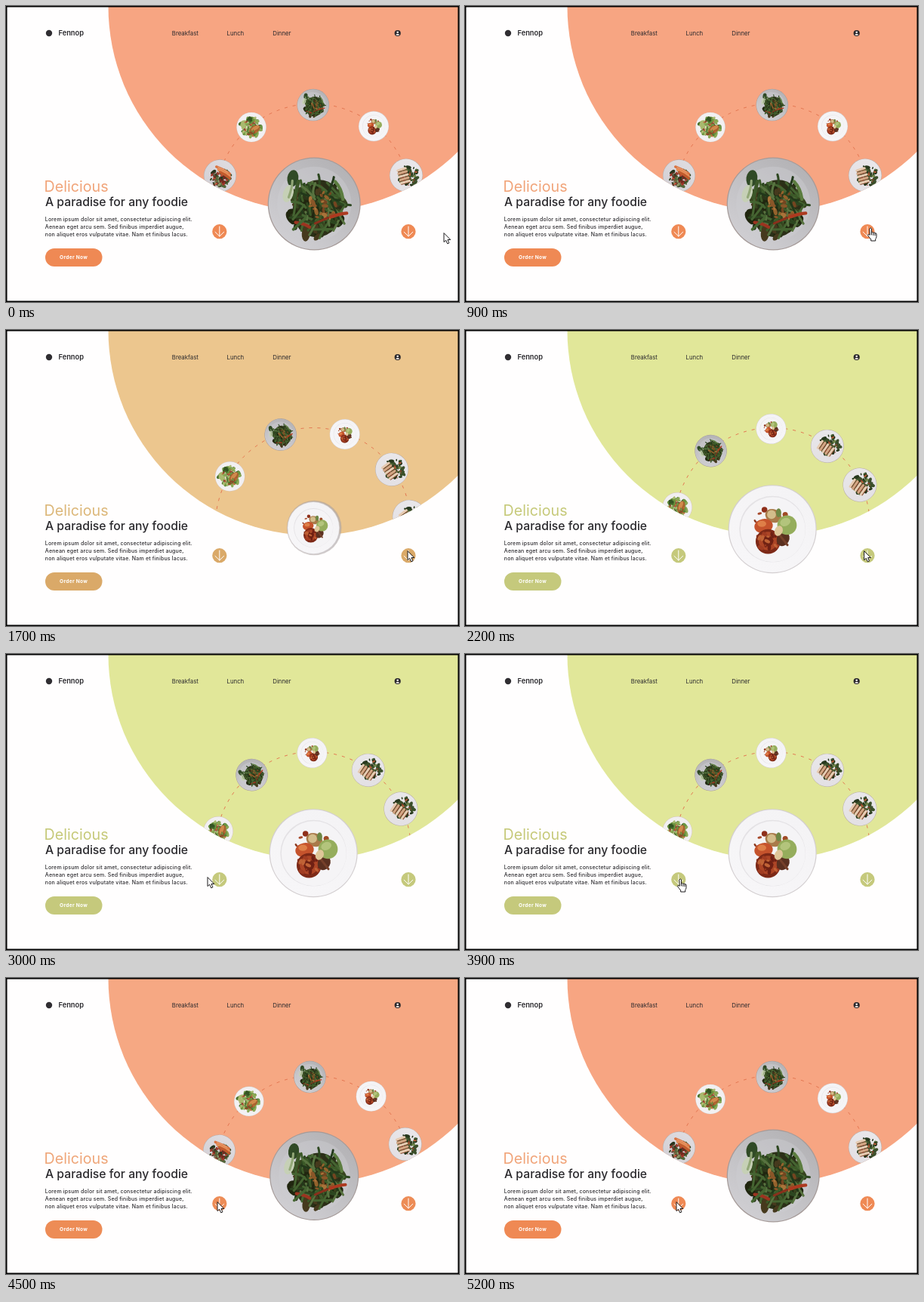
An HTML page with a canvas for the animation above (5.3 s loop, 600 by 392 pixels).

```html
<!DOCTYPE html>
<html lang="en">
<head>
<meta charset="utf-8">
<title>Food landing page</title>
<style>
  html, body { margin: 0; width: 600px; height: 392px; overflow: hidden; background: #fff; }
  canvas, svg { position: absolute; left: 0; top: 0; width: 600px; height: 392px; }
  text { font-family: Inter, "Open Sans", sans-serif; fill: #2a292d; }
  .brand { font-size: 9.3px; font-weight: 600; }
  .nav { font-size: 7.8px; }
  .title { font-size: 19.7px; }
  .lead { font-size: 15.75px; font-weight: 500; }
  .copy { font-size: 7px; font-weight: 500; letter-spacing: .18px; }
  .order { font-size: 6.6px; font-weight: 700; letter-spacing: .3px; fill: #fff; }
</style>
</head>
<body>
<canvas id="stage"></canvas>
<svg viewBox="0 0 600 392">
  <text class="brand" x="69.5" y="39.3">Fennop</text>
  <text class="nav" x="219.8" y="39.4">Breakfast</text>
  <text class="nav" x="292.5" y="39.4">Lunch</text>
  <text class="nav" x="353.3" y="39.4">Dinner</text>
  <text class="title" id="title" x="50.5" y="245.5">Delicious</text>
  <text class="lead" x="52" y="265">A paradise for any foodie</text>
  <text class="copy" x="51.8" y="285.4">Lorem ipsum dolor sit amet, consectetur adipiscing elit.</text>
  <text class="copy" x="51.8" y="295.2">Aenean eget arcu sem. Sed finibus imperdiet augue,</text>
  <text class="copy" x="51.8" y="305">non aliquet eros vulputate vitae. Nam et finibus lacus.</text>
  <text class="order" x="71" y="335.4">Order Now</text>
</svg>
<script>
const canvas = document.getElementById('stage');
const title = document.getElementById('title');
const ctx = canvas.getContext('2d');
const LOOP = 5300, STEP = 100, TAU = Math.PI * 2, RAD = Math.PI / 180;
const dpr = window.devicePixelRatio || 1;
canvas.width = 600 * dpr;
canvas.height = 392 * dpr;

const ORANGE = { back: [247, 165, 130], tint: [239, 137, 84], title: [241, 164, 121] };
const GREEN = { back: [225, 231, 153], tint: [197, 201, 124], title: [198, 201, 121] };

const lerp = (a, b, p) => a + (b - a) * p;
const ease = (t, from, to) => {
  const p = Math.min(1, Math.max(0, (t - from) / (to - from)));
  return p * p * (3 - 2 * p);
};
const mix = (key, p) =>
  `rgb(${ORANGE[key].map((v, i) => Math.round(lerp(v, GREEN[key][i], p)))})`;

function seeded(seed) {
  return () => {
    seed = (seed * 16807) % 2147483647;
    return seed / 2147483647;
  };
}

function disc(x, y, r, color) {
  ctx.fillStyle = color;
  ctx.beginPath();
  ctx.arc(x, y, r, 0, TAU);
  ctx.fill();
}

function blob(x, y, rx, ry, turn, color) {
  ctx.fillStyle = color;
  ctx.beginPath();
  ctx.ellipse(x, y, rx, ry, turn, 0, TAU);
  ctx.fill();
}

function strip(x1, y1, x2, y2, width, color, bend = 0) {
  ctx.strokeStyle = color;
  ctx.lineWidth = width;
  ctx.lineCap = 'round';
  ctx.beginPath();
  ctx.moveTo(x1, y1);
  ctx.quadraticCurveTo((x1 + x2) / 2 + bend, (y1 + y2) / 2 - bend, x2, y2);
  ctx.stroke();
}

// Scatter small leaves inside an ellipse around (x, y).
function scatter(seed, count, x, y, w, h, size, colors) {
  const rnd = seeded(seed * 7919);
  for (let i = 0; i < count; i++) {
    const a = rnd() * TAU, d = Math.sqrt(rnd()), s = size * (.5 + rnd());
    blob(x + Math.cos(a) * d * w, y + Math.sin(a) * d * h, s, s * .55, rnd() * TAU,
      colors[Math.floor(rnd() * colors.length)]);
  }
}

// The plate is shaded from its upper right to its lower left.
function plate(upper, lower, edge) {
  const shade = ctx.createLinearGradient(.6, -.8, -.6, .8);
  shade.addColorStop(0, upper);
  shade.addColorStop(1, lower);
  disc(0, 0, 1, edge);
  disc(0, 0, .98, shade);
}

// Every dish is drawn on a plate of radius 1.
const dishes = {
  beans() {
    plate('#b4b3b6', '#cfced2', '#a59a98');
    disc(0, 0, .8, 'rgba(205,204,208,.45)');
    blob(.08, .1, .54, .62, .2, '#2b2f17');
    scatter(41, 60, .06, .1, .6, .62, .12, ['#2c3519', '#37451f', '#46391d', '#20260f']);
    const rnd = seeded(77777), greens = ['#3c5a28', '#2d4720', '#587340', '#456431', '#22381a'];
    for (let i = 0; i < 54; i++) {
      const a = rnd() * TAU, d = Math.sqrt(rnd()) * .52;
      const x = .08 + Math.cos(a) * d, y = .06 + Math.sin(a) * d * 1.1;
      const turn = 1.1 + (rnd() - .5) * 2.4, l = .1 + rnd() * .14;
      strip(x - Math.cos(turn) * l, y - Math.sin(turn) * l,
        x + Math.cos(turn) * l, y + Math.sin(turn) * l, .05, greens[i % 5], (rnd() - .5) * .15);
    }
    scatter(19, 30, .19, .04, .3, .32, .055, ['#8a5628', '#a9733a', '#744520', '#94622c']);
    strip(-.4, .4, -.1, .5, .07, '#9c3420', .03);
    strip(.36, .28, .7, .2, .07, '#ad3a20', .03);
    strip(.02, .42, .3, .3, .05, '#8a301c');
    strip(.45, -.48, .62, -.1, .07, '#5c7d40', .05);
    strip(-.45, .55, -.2, .32, .06, '#456632');
    blob(-.46, -.55, .12, .18, .15, '#304a26');
    blob(-.56, -.22, .11, .19, .3, '#c6d0b6');
    strip(-.47, -.5, -.55, -.14, .05, '#93a878', .04);
    strip(-.34, -.48, -.42, -.14, .08, '#3d5829');
  },
  scallop() {
    plate('#f4f3f5', '#f7f6f8', '#d3ced0');
    disc(0, 0, .75, '#e4e2e5');
    disc(.01, .01, .735, '#f5f4f6');
    scatter(8, 9, -.02, -.02, .5, .48, .035, ['#a84a2b', '#8d3a20']);
    disc(-.18, -.44, .065, '#8f301b');
    disc(.29, -.33, .06, '#a04a26');
    blob(.02, -.3, .19, .15, .4, '#a97a4a');
    disc(-.02, -.33, .1, '#d3bd8b');
    blob(.14, -.37, .06, .1, 0, '#6e8745');
    blob(-.2, -.07, .21, .16, -.2, '#c5532c');
    blob(-.24, -.12, .1, .07, 0, '#de7f48');
    disc(-.1, .28, .28, '#7d2917');
    disc(-.1, .27, .21, '#ad4526');
    disc(-.1, .27, .12, '#702213');
    scatter(31, 16, -.1, .28, .24, .23, .05, ['#c06336', '#6f2014', '#a03c22']);
    blob(.24, .22, .14, .17, .5, '#5b3020');
    strip(.12, .08, .34, .36, .05, '#76402a');
    disc(.33, -.09, .22, '#95ad5c');
    blob(.29, -.16, .12, .09, -.4, '#b3c47c');
    blob(.14, .04, .09, .12, .4, '#dfc698');
  },
  salad() {
    plate('#f1eff1', '#f3f1f3', '#d3c3ba');
    scatter(5, 70, -.02, -.02, .68, .64, .16, ['#6a9440', '#46702c', '#8aa956', '#345423', '#a9b96e']);
    scatter(67, 16, -.02, 0, .6, .56, .09, ['#983a2c', '#d9d0b8', '#b9713e']);
    blob(.22, .14, .4, .24, -.5, '#a9622f');
    blob(.26, .06, .3, .12, -.5, '#d08a4c');
    blob(-.04, .4, .27, .11, -.3, '#8a4a27');
    scatter(29, 12, .05, .15, .45, .42, .07, ['#4f7a2e', '#6f9444', '#c06c38']);
  },
  salmon() {
    plate('#dedce0', '#d3d0d5', '#b5a8a4');
    scatter(12, 60, 0, .1, .6, .56, .13, ['#3a4a28', '#54663a', '#27341d', '#5c3524']);
    scatter(91, 26, -.05, .16, .52, .44, .09, ['#a03428', '#c0523a', '#74281f', '#8d9468']);
    for (let i = 0; i < 3; i++) {
      strip(-.22 + i * .12, -.55 + i * .17, .6, -.12 + i * .14, .16, ['#d9713f', '#e58e58', '#c25a2c'][i], .05);
    }
    strip(-.12, -.52, .5, -.2, .04, '#f0b48a', .04);
  },
  chicken() {
    plate('#e9e7ea', '#e3e0e4', '#b5aaa6');
    scatter(23, 70, .14, .04, .6, .6, .13, ['#3b4f2a', '#27381d', '#536a38', '#1f2d14']);
    scatter(58, 18, .2, .1, .5, .5, .08, ['#96382a', '#b25a38', '#71874a']);
    for (let i = 0; i < 5; i++) {
      const y = -.4 + i * .19;
      strip(-.5 + i * .05, y + .12, -.04 + i * .06, y - .02, .15, i % 2 ? '#d3a584' : '#e6cbb2');
      strip(-.48 + i * .05, y + .2, 0 + i * .06, y + .06, .045, '#84492e');
    }
  }
};

function serve(name, x, y, r, turn = 0) {
  ctx.save();
  ctx.translate(x, y);
  ctx.rotate(turn);
  ctx.scale(r, r);
  dishes[name]();
  ctx.restore();
}

const HUB = { x: 406.8, y: 259, r: 128 };
const wheel = [
  ['salmon', -74.5, 21.5], ['salad', -39.7, 19.8], ['beans', 0, 21.3],
  ['scallop', 38.8, 20], ['chicken', 74.2, 22], ['chicken', 104.5, 22.5]
];

function drawWheel(p) {
  const turn = -39.4 * p * RAD;
  ctx.setLineDash([4, 7]);
  ctx.lineCap = 'butt';
  ctx.lineWidth = 1;
  ctx.strokeStyle = '#e2744f';
  ctx.beginPath();
  ctx.arc(HUB.x, HUB.y, 129.5, Math.PI, TAU);
  ctx.stroke();
  ctx.setLineDash([]);
  for (const [name, degrees, r] of wheel) {
    const a = degrees * RAD + turn;
    serve(name, HUB.x + HUB.r * Math.sin(a), HUB.y - HUB.r * Math.cos(a), r, turn);
  }
}

function drawMainDish(p, toGreen) {
  const beans = () => serve('beans', 408.2, 262, lerp(61.5, 11, p));
  const scallop = () => serve('scallop', 407.2, lerp(260.5, 263.7, p), lerp(11, 58.5, p));
  const [leaving, entering, done] = toGreen ? [beans, scallop, p] : [scallop, beans, 1 - p];
  if (done < 1) {
    ctx.globalAlpha = 1 - done;
    leaving();
    ctx.globalAlpha = 1;
  }
  if (done > 0) entering();
}

function drawArrowButton(x, color) {
  disc(x, 298.7, 9.6, color);
  ctx.strokeStyle = '#fff';
  ctx.lineWidth = 1;
  ctx.lineCap = 'round';
  ctx.stroke(new Path2D(`M${x} 292V305M${x - 5.8} 299.3L${x} 305L${x + 5.8} 299.3`));
}

function drawAccount() {
  disc(518.7, 36, 4.1, '#28262a');
  disc(518.7, 34.8, 1.35, '#f3ece8');
  blob(518.7, 38, 2.3, 1, 0, '#f3ece8');
}

const arrowShape = new Path2D('M0 0V11.6L2.7 9.2L4.7 13.8L6.9 12.9L5 8.5H8.4Z');
const handShape = new Path2D('M3 1.8Q4.3 -.3 5.5 1.8V7Q7 5.8 7.8 7.3Q9.2 6.3 10 7.8' +
  'Q11.8 7.2 12 9V12.5Q11.8 14.5 10.7 15.7V18H4.7V16Q2.5 13.5 .5 10.7Q.2 8.5 3 10Z');

function drawPointer(x, y, hand) {
  const shape = hand ? handShape : arrowShape;
  ctx.save();
  ctx.translate(x + (hand ? 1 : 0), y);
  ctx.fillStyle = '#fff';
  ctx.strokeStyle = '#1c1a1c';
  ctx.lineWidth = 1;
  ctx.lineJoin = 'round';
  ctx.fill(shape);
  ctx.stroke(shape);
  if (hand) ctx.stroke(new Path2D('M5.5 7V10M7.8 8V10.5M10 8.5V10.8'));
  ctx.restore();
}

function pointerAt(t) {
  const stops = [[0, 580, 301], [250, 580, 301], [800, 532, 293], [2150, 532, 293],
    [2900, 267, 296], [3150, 267, 296], [3500, 280, 297], [LOOP, 280, 297]];
  const i = stops.findIndex(s => s[0] > t);
  const [t0, x0, y0] = stops[i - 1], [t1, x1, y1] = stops[i];
  const p = ease(t, t0, t1);
  return [lerp(x0, x1, p), lerp(y0, y1, p)];
}

function draw(t) {
  const p = ease(t, 1400, 2000) - ease(t, 3980, 4580);
  const tint = mix('tint', p);
  ctx.setTransform(dpr, 0, 0, dpr, 0, 0);
  ctx.fillStyle = '#fffefe';
  ctx.fillRect(0, 0, 600, 392);

  ctx.save();
  ctx.beginPath();
  ctx.arc(407, .5, 271.5, 0, TAU);
  ctx.clip();
  ctx.fillStyle = mix('back', p);
  ctx.fillRect(0, 0, 600, 392);
  drawWheel(p);
  ctx.restore();

  drawMainDish(p, t < 3000);
  disc(57, 36, 4.2, '#302e32');
  drawAccount();
  drawArrowButton(282.8, tint);
  drawArrowButton(533, tint);

  ctx.fillStyle = tint;
  ctx.beginPath();
  ctx.roundRect(52, 321, 75.5, 24, 12);
  ctx.fill();
  title.style.fill = mix('title', p);

  ctx.strokeStyle = '#000';
  ctx.lineWidth = 1.5;
  ctx.lineJoin = 'miter';
  ctx.strokeRect(.75, .75, 598.5, 390.5);

  const hand = (t >= 700 && t < 1400) || (t >= 3350 && t < 3980);
  drawPointer(...pointerAt(t), hand);
}

function tick(now) {
  draw(Math.floor((now % LOOP) / STEP) * STEP);
  requestAnimationFrame(tick);
}
draw(0);
requestAnimationFrame(tick);
</script>
</body>
</html>
```
